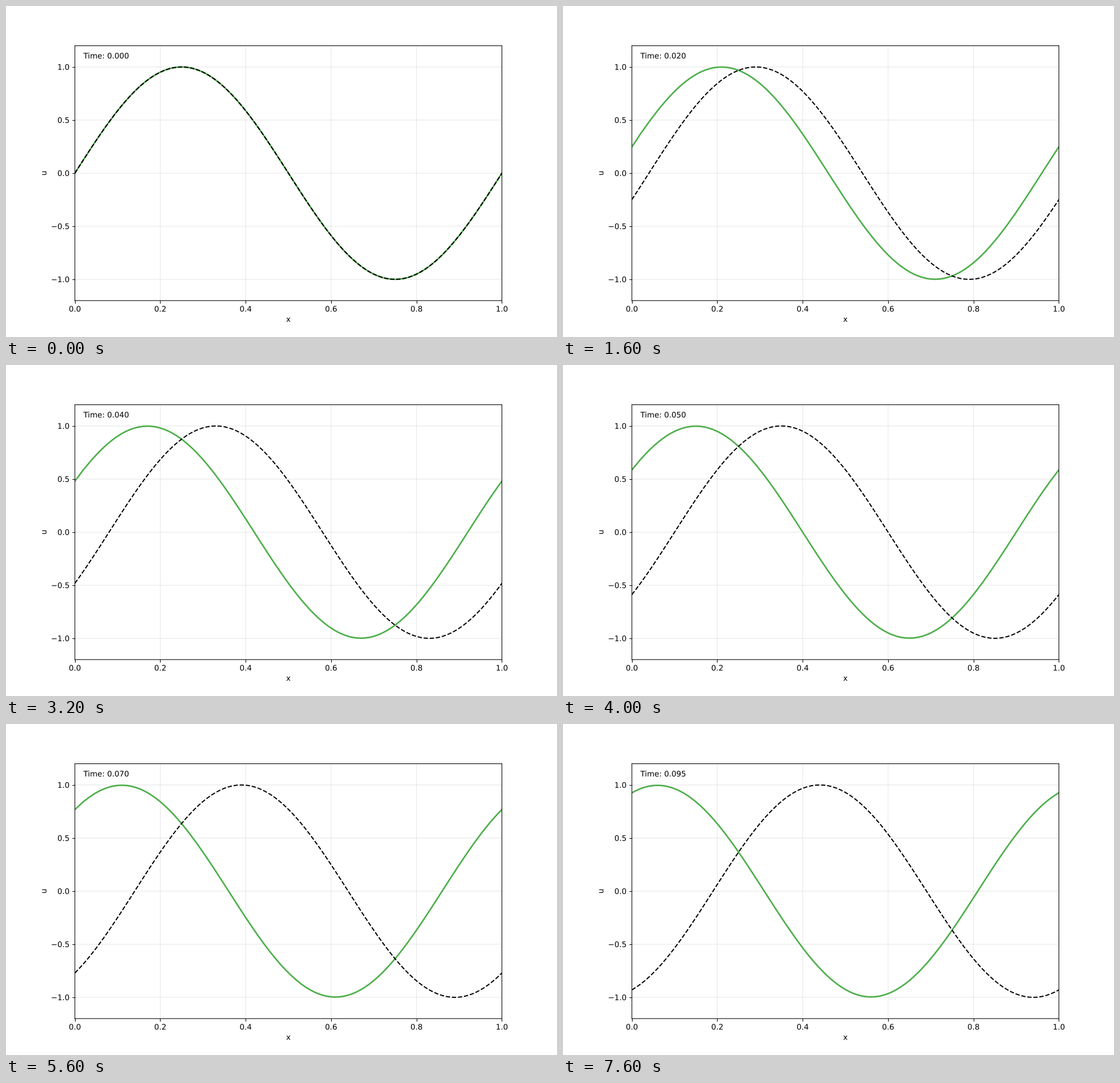
These frames come from a looping animation (966x580 px, 8 s). A matplotlib script:

```python
import numpy as np
import matplotlib.pyplot as plt
from matplotlib.animation import FuncAnimation
from matplotlib.patheffects import Normal
from matplotlib.text import Text

WIDTH, HEIGHT, DPI = 966, 580, 96.6
FRAMES, INTERVAL = 20, 400
DT, SPEED, DAMPING = 0.005, 2.0, 0.04

# Place lines and glyphs at fractions of a pixel.
plt.rcParams.update({
    "font.family": "DejaVu Sans",
    "path.snap": False,
    "text.hinting": "none",
})

x = np.linspace(0, 1, 101)
node = np.arange(x.size)


def wave(position):
    return np.sin(2 * np.pi * position)


def numerical(t):
    """Left-moving wave with slight damping and a faint ripple at the inlet."""
    u = np.exp(-DAMPING * t) * wave(x + SPEED * t)
    if t > 0:
        ripple = 0.005 * (1 - t / 0.1) * (-1.0) ** node * np.exp(-x / 0.02)
        ripple[0] = 0
        u += ripple
    return u


# The small margin keeps the pixel size from being truncated.
fig, ax = plt.subplots(figsize=((WIDTH + 0.001) / DPI, (HEIGHT + 0.001) / DPI),
                       dpi=DPI)
ax.set(xlim=(0, 1), ylim=(-1.2, 1.2), xlabel="x", ylabel="u")
ax.set_xticks(np.linspace(0, 1, 6))
ax.set_yticks([-1, -0.5, 0, 0.5, 1])
ax.grid(alpha=0.3)

numeric_line, = ax.plot([], [], color="#4daf4a", lw=2)
exact_line, = ax.plot([], [], "k--", lw=1.5)
time_text = ax.text(0.02, 0.95, "", transform=ax.transAxes)

# A path effect makes text draw as outlines instead of pixel-aligned bitmaps.
for text in fig.findobj(Text):
    text.set_path_effects([Normal()])


def update(frame):
    t = frame * DT
    numeric_line.set_data(x, numerical(t))
    exact_line.set_data(x, wave(x - SPEED * t))
    time_text.set_text(f"Time: {t:.3f}")
    return numeric_line, exact_line, time_text


animation = FuncAnimation(fig, update, frames=FRAMES, interval=INTERVAL,
                          repeat=True, repeat_delay=0)
plt.show()
```
